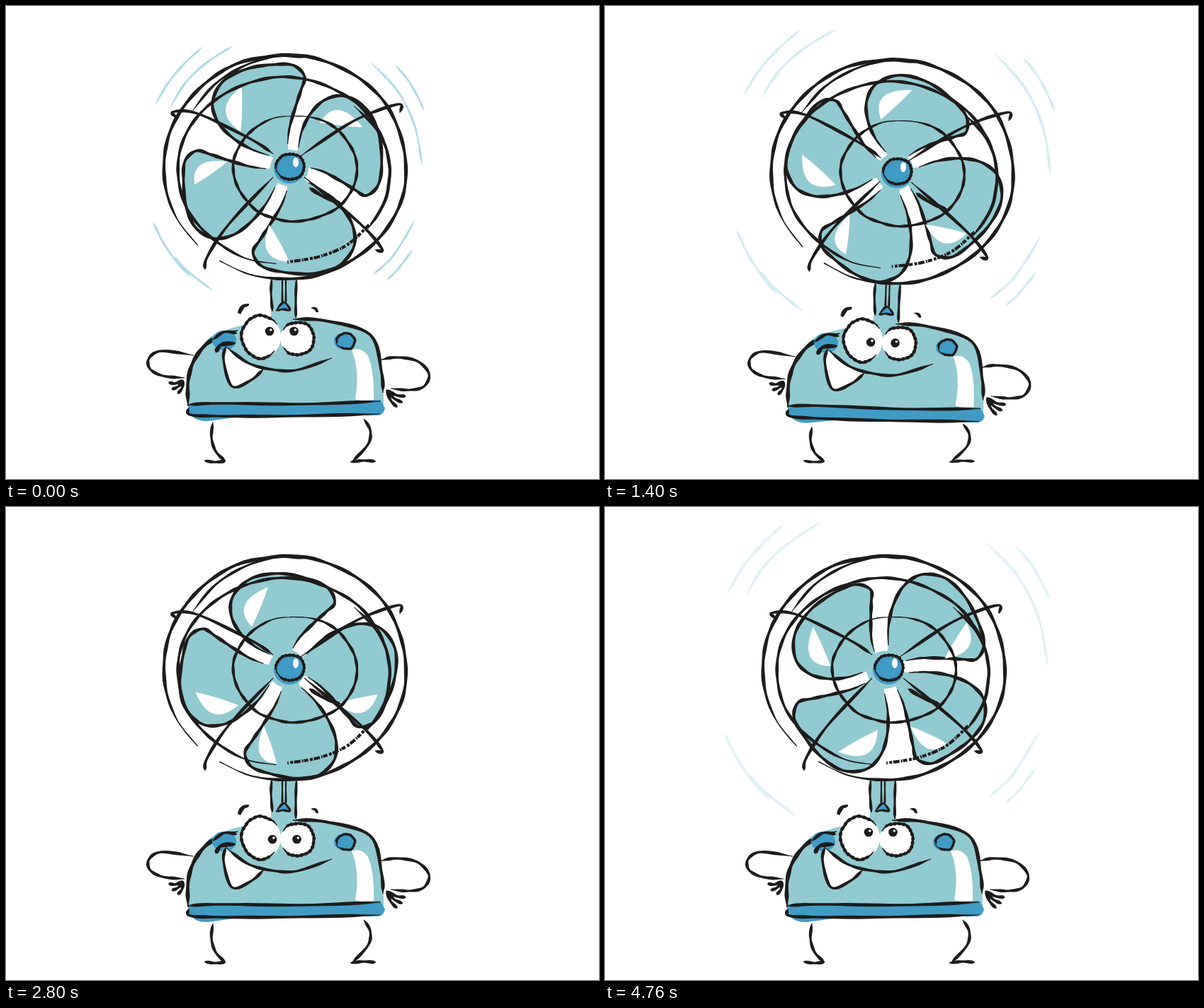
An HTML page for the animation above (5.04 s loop, 837 px wide and 669 px high).

```html
<!DOCTYPE html>
<html lang="en">
<head>
<meta charset="utf-8">
<title>Cheerful fan</title>
<style>
  html, body { margin: 0; width: 100%; height: 100%; overflow: hidden; background: #fff; }
  svg { display: block; width: 100%; height: 100%; }
</style>
</head>
<body>
<svg viewBox="0 0 837 669">
  <g id="legs"></g>
  <g id="figure">
    <g id="wind"></g>
    <g id="arms"></g>
    <g id="neck"></g>
    <g id="blades"></g>
    <g id="cage"></g>
    <g id="body"></g>
    <g id="pupils"></g>
  </g>
</svg>
<script>
const INK = '#1d1c1b', TEAL = '#92cad1', BLUE = '#409bc5', WHITE = '#fff', BREEZE = '#b3dce5';
const $ = id => document.getElementById(id);
const frac = x => x - Math.floor(x);
const noise = i => frac(Math.sin(i * 12.9898) * 43758.5453) * 2 - 1;
const polar = (cx, cy, rx, ry, deg) =>
  [cx + rx * Math.cos(deg * Math.PI / 180), cy + ry * Math.sin(deg * Math.PI / 180)];

function add(layer, tag, attrs) {
  const el = document.createElementNS('http://www.w3.org/2000/svg', tag);
  for (const key in attrs) el.setAttribute(key, attrs[key]);
  $(layer).appendChild(el);
}

const toPath = list => 'M' + list.map(p => p[0].toFixed(1) + ' ' + p[1].toFixed(1)).join('L');
const shape = (layer, d, color) => add(layer, 'path', { d, fill: color });
const oval = (layer, cx, cy, rx, ry, color) => add(layer, 'ellipse', { cx, cy, rx, ry, fill: color });

// Catmull-Rom samples through points, given as a list or as "x,y x,y"
function spline(points) {
  const pts = typeof points === 'string' ? points.split(' ').map(p => p.split(',').map(Number)) : points;
  const last = pts.length - 1, out = [];
  const at = i => pts[Math.max(0, Math.min(last, i))];
  for (let i = 0; i < last; i++) {
    const [a, b, c, d] = [at(i - 1), at(i), at(i + 1), at(i + 2)];
    for (let t = 0; t < 1; t += 0.125) {
      out.push([0, 1].map(k => 0.5 * (2 * b[k] + (c[k] - a[k]) * t
        + (2 * a[k] - 5 * b[k] + 4 * c[k] - d[k]) * t * t
        + (3 * b[k] - a[k] - 3 * c[k] + d[k]) * t * t * t)));
    }
  }
  return out.concat([pts[last]]);
}

// Brush stroke with tapered ends and a slightly uneven edge
function ink(layer, points, w = 4, color = INK) {
  const line = spline(points), n = line.length - 1, left = [], right = [];
  line.forEach(([x, y], i) => {
    const p = line[Math.max(0, i - 1)], q = line[Math.min(n, i + 1)];
    const len = Math.hypot(q[0] - p[0], q[1] - p[1]) || 1, u = i / n;
    const taper = Math.max(0.35, Math.min(1, u * 10, (1 - u) * 10));
    const h = w / 2 * taper * (1 + 0.18 * Math.sin(i * 0.8 + w));
    const nx = (p[1] - q[1]) / len * h, ny = (q[0] - p[0]) / len * h;
    left.push([x + nx, y + ny]);
    right.unshift([x - nx, y - ny]);
  });
  shape(layer, toPath(left.concat(right)) + 'Z', color);
}

// Hand-drawn piece of an ellipse, angles in degrees
function arcPoints(cx, cy, rx, ry, from, to, shake = 1) {
  const n = Math.max(3, Math.round(Math.abs(to - from) / 16));
  return Array.from({ length: n + 1 }, (_, i) => {
    const r = noise(i + rx) * shake;
    return polar(cx, cy, rx + r, ry + r, from + (to - from) * i / n);
  });
}
const arc = (layer, w, ...args) => ink(layer, arcPoints(...args), w);
const dry = (layer, points, w) => add(layer, 'path', {
  d: toPath(spline(points)), fill: 'none', stroke: INK, 'stroke-width': w, 'stroke-dasharray': '9 1.5 4 2.5 6 1 2 2'
});

// Breeze: radius, start and end angle
[[209, 205, 234], [189, 207, 245], [207, 316, 337], [187, 308, 359], [192, 23, 52],
 [210, 34, 49], [208, 132, 158], [205, 122, 142]]
  .forEach(([r, a, b]) => ink('wind', arcPoints(400, 228, r, r, a, b), 3, BREEZE));

// Neck
shape('neck', 'M374 385H411V446H374Z', TEAL);
ink('neck', '375,386 374,405 376,432', 3.5);
ink('neck', '410,386 409,412 409,441', 3.5);
for (const x of [390, 395]) ink('neck', `${x},387 ${x},420`, 2.5);
shape('neck', 'M381 430Q390 410 401 430Z', BLUE);
ink('neck', '381,431 392,419 401,430 391,429 381,431', 3);

// One blade as angle and radius from the hub, reused with its own direction, spread, length and lit side
const RIM = [[-40, 34], [-44, 60], [-42, 90], [-37, 120], [-29, 143], [-17, 154], [-3, 152],
             [12, 147], [23, 144], [30, 130], [29, 110], [26, 85], [20, 55], [15, 33]];
const blades = [[-111, 1, 1, -1], [-17, 1.25, 0.88, -0.95], [82, 1.05, 1.01, 0.8], [163, 0.9, 1.03, 0.75]];
const bladePoint = ([mid, spread, len], a, r) => polar(401, 228, r * len, r * len, mid + a * spread);

for (const b of blades) {
  const rim = RIM.map(([a, r]) => bladePoint(b, a, r));
  shape('blades', toPath(spline(rim)) + 'L401 228Z', TEAL);
  ink('blades', rim, 4.4);
  const lit = (a, r) => bladePoint(b, a * b[3], r).map(v => v.toFixed(1)).join(' ');
  shape('blades', `M${lit(33, 86)}Q${lit(34, 138)} ${lit(10, 133)}Q${lit(17, 108)} ${lit(33, 86)}Z`, WHITE);
}
oval('blades', 400, 229, 27, 26, TEAL);

// Cage
arc('cage', 4.6, 394, 228, 171, 158.5, 136, 483);
arc('cage', 3.4, 400, 236, 160, 166, 212, 280);
arc('cage', 4, 392, 233, 149, 132, 94, 395);
arc('cage', 3.4, 391, 236, 151, 128, -48, 38);
dry('cage', arcPoints(392, 233, 149, 130, 36, 88), 4.2);
arc('cage', 3.8, 408, 230, 87, 75, -95, 268);
ink('cage', '243,159 235,150 270,152 345,188 377,209', 4);
ink('cage', '416,212 490,163 553,139 556,151', 4);
ink('cage', '377,242 315,308 284,355 281,373', 4.2);
ink('cage', '421,242 500,308 531,344 521,345', 4.2);
ink('cage', '428,257 449,270 473,279', 5);
oval('cage', 400, 230, 22, 21, BLUE);
arc('cage', 4, 401, 227, 20, 18, 150, 515, 0.6);
oval('cage', 409, 221, 4, 7, WHITE);

// Arms and hands
function hand(x, y, angle, turn, len) {
  for (let i = 0; i < 3; i++) {
    const tip = polar(x, y, len, len, angle + turn * i);
    const bend = polar(x, y, len * 0.55, len * 0.55, angle + turn * i + turn / 2);
    ink('arms', [[x, y], bend, tip], 4.2);
  }
}
ink('arms', '265,494 220,488 202,498 203,513 221,523 252,526', 4);
ink('arms', '527,501 550,497 580,502 597,520 590,538 570,543 543,541', 4);
hand(250, 529, 170, -29, 21);
hand(537, 543, 18, 20, 29);

// Body
shape('body', 'M258 575V525Q262 490 290 467Q330 446 410 441Q490 444 514 464Q533 484 533 562V575Z', TEAL);
shape('body', 'M488 487Q501 481 511 495Q520 515 519 558Q506 560 493 556Q500 515 488 487Z', WHITE);
shape('body', 'M257 563L420 562L528 557L535 569Q533 580 520 579L330 581L285 587Q257 588 257 563Z', BLUE);
ink('body', '257,566 257,530 265,502 282,479 303,466 327,459', 5.4);
ink('body', '405,443 450,445 514,465 530,518 532,547', 4.6);
ink('body', '256,564 300,562 420,563 529,559', 4.2);
ink('body', '258,568 260,578 300,580 400,580 528,577', 4.2);

// Face
oval('body', 308, 473, 17, 14, BLUE);
ink('body', '292,472 308,461 326,463', 4);
ink('body', '296,490 304,479 324,477', 5.5);
shape('body', 'M309 483Q306 518 318 538Q335 541 346 529Q360 520 363 514Q335 506 318 487Z', WHITE);
ink('body', '311,480 307,500 319,538 346,529 364,513', 4);
ink('body', '312,483 342,505 375,514 410,515 460,498', 4);
oval('body', 411, 470, 24, 23, WHITE);
oval('body', 360, 468, 28, 30, WHITE);
arc('body', 4.2, 360, 468, 27, 30, 42, 325);
arc('body', 4.2, 411, 470, 24, 23, -150, 148);
oval('body', 478, 474, 15, 12, BLUE);
arc('body', 3.4, 480, 474, 13, 11, 150, 510);
shape('body', 'M327 434Q329 420 343 421Q344 425 337 426Q334 430 331 436Z', INK);
shape('body', 'M430 427Q440 423 441 433Q437 434 436 430Q433 428 430 427Z', INK);

for (const x of [371, 405.5]) {
  oval('pupils', x, 470, 6.3, 6.3, INK);
  oval('pupils', x + 1.8, 468, 1.8, 1.8, WHITE);
}

// Legs
ink('legs', '292,589 290,610 296,630 310,644', 4);
ink('legs', '505,584 514,600 511,620 488,645', 4);
ink('legs', '280,643 294,645 310,644', 4);
ink('legs', '486,645 504,643 522,644', 4);

const STEP = 280, COUNT = 18;

// Blades turn at a nearly even pace between these key poses: step, degrees
const TURNS = [[0, 0], [2, 422], [5, 1029], [7, 1449], [10, 2086], [12, 2450], [17, 3480]];
function turn(k) {
  const i = Math.max(1, TURNS.findIndex(key => key[0] >= k));
  const [[k0, a0], [k1, a1]] = [TURNS[i - 1], TURNS[i]];
  return a0 + (a1 - a0) * (k - k0) / (k1 - k0);
}

function pose(k) {
  const set = (id, value) => $(id).setAttribute('transform', value);
  // The body wobbles during the first half of the loop
  const swing = k < 9 ? Math.sin(k * Math.PI / 9) : 0, beat = 0.9 * (k - 5);
  const tilt = 1.85 * swing * Math.cos(2 * beat), drop = 6.5 * swing * Math.cos(beat);
  set('figure', `translate(0 ${drop}) rotate(${tilt} 400 600)`);
  set('legs', `translate(0 645) scale(1 ${1 - drop / 58}) translate(0 -645)`);
  set('blades', `rotate(${turn(k)} 398 231)`);

  // The breeze spreads and fades, again and again
  const reach = 190 + 80 * frac(k * 0.675);
  set('wind', `translate(400 228) scale(${reach / 190}) translate(-400 -228)`);
  $('wind').setAttribute('opacity', Math.max(0, Math.min(1, (250 - reach) / 58)));

  const up = k < 2 || k > 15, aside = k > 8 && k < 12;
  set('pupils', `translate(${aside ? 5 : up ? 1 : 0} ${up ? -10 : 0})`);
}

const start = performance.now();
let shown = -1;
function tick() {
  const k = Math.floor(Math.max(0, performance.now() - start) / STEP) % COUNT;
  if (k !== shown) pose(shown = k);
  requestAnimationFrame(tick);
}
tick();
</script>
</body>
</html>
```
